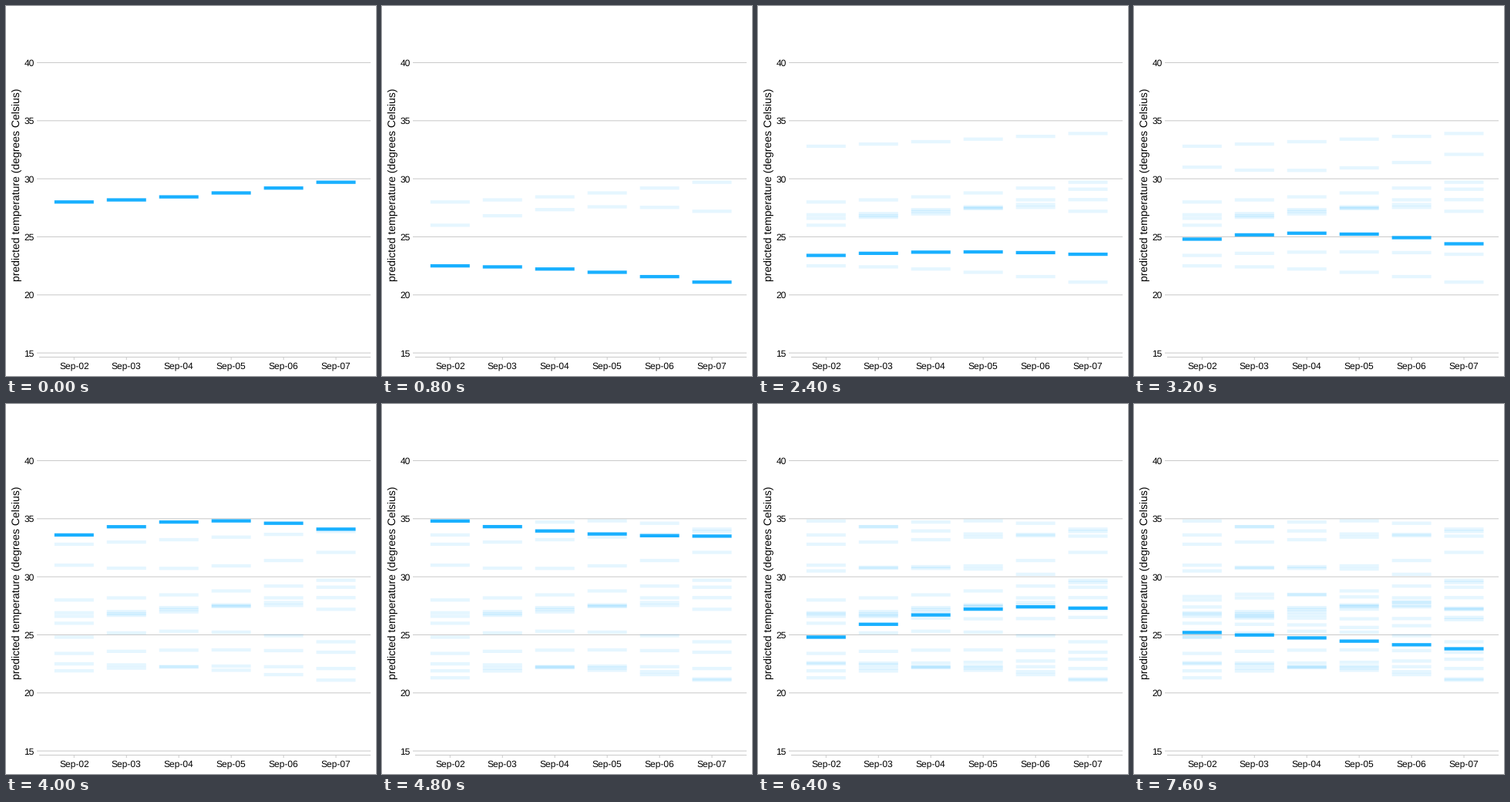
Recreate the animation shown at these times as a matplotlib script. Size 480x480 px, loop 8000 ms.

```python
import matplotlib.pyplot as plt
from matplotlib.animation import FuncAnimation
from matplotlib.patches import Rectangle

SIZE, DPI = 480, 72          # at 72 dpi one point is one pixel
STEP_MS, DAYS = 400, 6
BLUE, GREY = "#00a8ff", "#cccccc"
CURRENT_ALPHA, PAST_ALPHA = 0.9, 0.1
BAR_W, BAR_H = 51, 4.3
LEFT, RIGHT, AXIS_Y = 43, 473, 455.5

plt.rcParams["font.family"] = "Liberation Sans"
plt.rcParams["text.hinting"] = "none"

# Temperature at the start, middle and end of each simulated forecast.
FORECASTS = [
    (28.0, 28.6, 29.7), (26.0, 27.5, 27.2), (22.5, 22.1, 21.1),
    (26.6, 27.2, 29.1), (26.9, 27.3, 28.2), (32.8, 33.3, 33.9),
    (23.4, 23.7, 23.5), (31.0, 30.8, 32.1), (24.8, 25.3, 24.4),
    (21.9, 22.3, 22.1), (33.6, 34.8, 34.1), (21.3, 22.2, 21.2),
    (34.8, 33.8, 33.5), (22.6, 22.6, 22.9), (30.5, 30.8, 29.5),
    (26.8, 26.4, 26.5), (24.8, 27.0, 27.3), (27.4, 25.7, 26.3),
    (28.3, 28.4, 27.2), (25.2, 24.6, 23.8),
]


def forecast_temp(start, middle, end, day):
    """Parabola through the three key temperatures."""
    t = day / (DAYS - 1)
    return (start * (1 - t) * (1 - 2 * t) + middle * 4 * t * (1 - t)
            + end * t * (2 * t - 1))


def day_x(day):
    return 88.3 + 67.95 * day


def temp_y(temp):
    return 450.1 - 15.065 * (temp - 15)


fig = plt.figure(figsize=(SIZE / DPI, SIZE / DPI), dpi=DPI, facecolor="white")
ax = fig.add_axes([0, 0, 1, 1])
ax.set_xlim(0, SIZE)
ax.set_ylim(SIZE, 0)
ax.axis("off")


def rule(xs, ys):
    ax.plot(xs, ys, color=GREY, lw=1.07, solid_capstyle="butt", snap=False,
            zorder=1)


def make_bar(day, temp):
    bar = Rectangle((day_x(day) - BAR_W / 2, temp_y(temp) - BAR_H / 2),
                    BAR_W, BAR_H, fc=BLUE, lw=0, snap=False)
    return ax.add_patch(bar)


for temp in range(15, 41, 5):
    y = temp_y(temp)
    rule((LEFT - 3, RIGHT), (y, y))
    ax.text(36.8, y + 4.3, str(temp), size=12, ha="right", va="baseline")

rule((LEFT, RIGHT), (AXIS_Y, AXIS_Y))
for day in range(DAYS):
    x = day_x(day)
    rule((x, x), (AXIS_Y, AXIS_Y + 3.5))
    ax.text(x, 471, f"Sep-{day + 2:02d}", size=12, ha="center", va="baseline")

ax.text(18, 231.5, "predicted temperature (degrees Celsius)", size=14,
        rotation=90, rotation_mode="anchor", ha="center", va="baseline")

rows = [[make_bar(day, forecast_temp(*keys, day)) for day in range(DAYS)]
        for keys in FORECASTS]


def update(frame):
    for i, row in enumerate(rows):
        for bar in row:
            bar.set_visible(i <= frame)
            bar.set_alpha(CURRENT_ALPHA if i == frame else PAST_ALPHA)
            bar.set_zorder(3 if i == frame else 2)
    return [bar for row in rows for bar in row]


anim = FuncAnimation(fig, update, frames=len(FORECASTS), interval=STEP_MS,
                     repeat=True, repeat_delay=0, blit=False)
plt.show()
```
